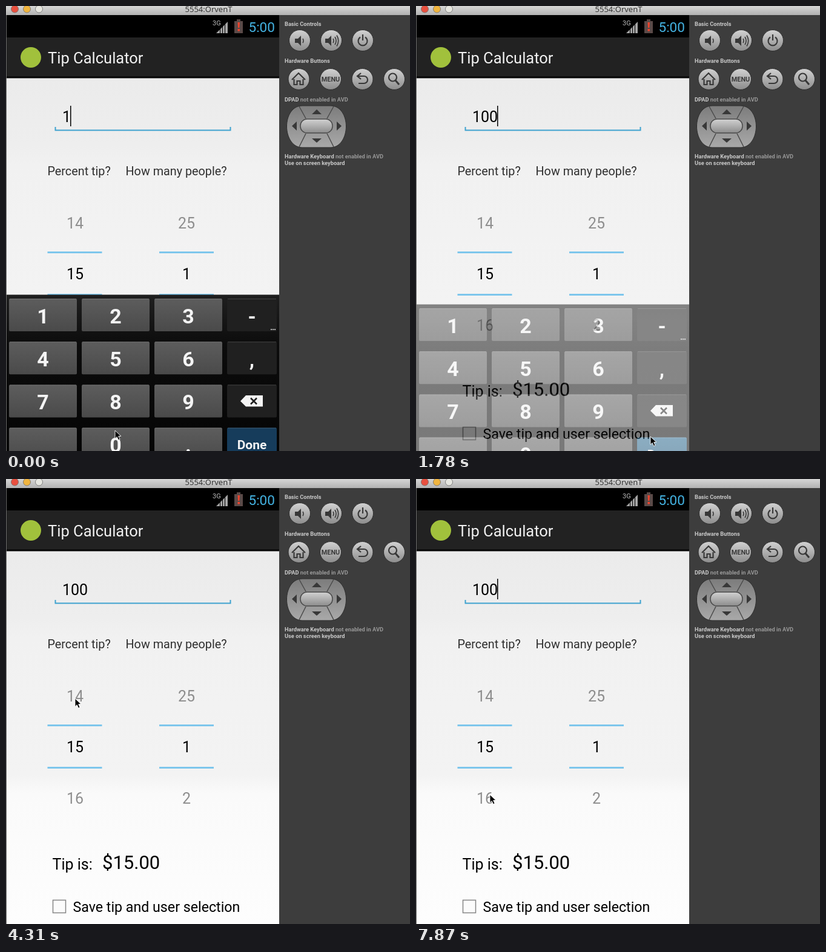
These frames come from a looping animation (667 by 736 pixels, 8 s). An HTML page:

```html
<!DOCTYPE html>
<html lang="en">
<head>
<meta charset="utf-8">
<title>Tip Calculator</title>
<style>
  html, body { margin: 0; width: 100%; height: 100%; overflow: hidden; background: #3d3d3d; }
  svg { display: block; width: 667px; height: 736px; }
  text { font-family: Roboto, sans-serif; }
  .mid { text-anchor: middle; }
  .wheel { font-size: 25px; text-anchor: middle; }
  .faint { fill: #8e8e8e; }
  .label { font-size: 19.8px; fill: #303030; }
  .note { font-size: 9.25px; font-weight: 700; fill: #c9c9c9; }
  .note .dim { fill: #979797; }
  .digit { font-size: 34px; font-weight: 700; fill: #f4f4f4; text-anchor: middle; }
  .key { fill: url(#key); }
  .dark { fill: #202020; }
  .done { fill: #163c5b; }
  .pressed { fill: url(#pressed); }
  .icon { fill: none; stroke: #383838; stroke-width: 2.2; }
  .solid { fill: #383838; stroke: none; }
</style>
</head>
<body>
<svg viewBox="0 0 667 736">
  <defs>
    <linearGradient id="bar" x2="0" y2="1"><stop stop-color="#d6d6d6"/><stop offset="1" stop-color="#b2b2b2"/></linearGradient>
    <linearGradient id="page" x2="0" y2="1">
      <stop stop-color="#ebebeb"/><stop offset=".18" stop-color="#eee"/>
      <stop offset=".23" stop-color="#f1f1f1"/><stop offset=".6" stop-color="#f3f3f3"/>
      <stop offset=".65" stop-color="#fafafa"/><stop offset="1" stop-color="#fdfdfd"/>
    </linearGradient>
    <linearGradient id="backing" x2="0" y2="1"><stop stop-color="#1f1f1f"/><stop offset=".3" stop-color="#0c0c0c"/><stop offset="1" stop-color="#040404"/></linearGradient>
    <linearGradient id="key" x2="0" y2="1"><stop stop-color="#5d5d5d"/><stop offset="1" stop-color="#4a4a4a"/></linearGradient>
    <linearGradient id="pressed" x2="0" y2="1"><stop stop-color="#28688f"/><stop offset="1" stop-color="#1a5075"/></linearGradient>
    <linearGradient id="metal" x2="0" y2="1"><stop stop-color="#d2d2d2"/><stop offset="1" stop-color="#8c8c8c"/></linearGradient>
    <linearGradient id="pad" x2="0" y2="1"><stop stop-color="#7c7c7c"/><stop offset="1" stop-color="#a9a9a9"/></linearGradient>
  </defs>

  <!-- Side panel -->
  <rect width="667" height="736" fill="#3d3d3d"/>
  <text class="note" x="460" y="32.5">Basic Controls</text>
  <text class="note" x="460" y="93.5">Hardware Buttons</text>
  <text class="note" x="460" y="157.5">DPAD <tspan class="dim">not enabled in AVD</tspan></text>
  <text class="note" x="460" y="252">Hardware Keyboard <tspan class="dim">not enabled in AVD</tspan></text>
  <text class="note" x="460" y="262.5">Use on screen keyboard</text>
  <g id="knobs"></g>
  <path class="solid" d="M477 54h5l5-5v17l-5-5h-5zM527 54h5l5-5v17l-5-5h-5z"/>
  <path class="icon" d="M490 54q2 3.500 0 7M540 54q2 3.500 0 7M543 51q4 6.500 0 13M546 48.500q5.500 9 0 18" style="stroke-width:1.6"/>
  <path class="icon" d="M585 51.500a7.500 7.500 0 1 0 8 0M589 47v10"/>
  <path class="icon" d="M472 122l11-11 11 11M475.500 121v9h5v-6h5v6h5v-9"/>
  <text class="mid" x="536" y="125" font-size="10.8" font-weight="700" fill="#383838">MENU</text>
  <path class="icon" d="M586 111l-6 5 6 5M581 116h10a5.500 5.500 0 0 1 0 12h-9"/>
  <circle class="icon" cx="638.500" cy="118" r="6.500"/><path class="icon" d="M643 123l6 7" style="stroke-width:3"/>
  <path d="M489 165h47c16 0 25.500 16 25.500 34s-9.500 35-25.500 35h-47c-16 0-25.500-17-25.500-35s9.500-34 25.500-34z" fill="url(#pad)" stroke="#2c2c2c"/>
  <path d="M484 166l11 20M541 166l-11 20M484 233l11-22M541 233l-11-22" stroke="#4a4a4a" stroke-width="1.500"/>
  <rect x="486" y="187" width="53" height="23" rx="11" fill="url(#metal)" stroke="#4a4a4a" stroke-width="1.500"/>
  <path class="solid" d="M505 179l8-8 8 8zM505 219l8 7 8-7zM480 191v15l-8-7.500zM546 191v15l8-7.500z"/>

  <!-- Window bar -->
  <rect width="667" height="15" fill="url(#bar)"/>
  <g stroke="#6b6b6b" stroke-width=".8">
    <circle cx="14.500" cy="5" r="6" fill="#e8503f"/><circle cx="34.500" cy="5" r="6" fill="#efb43f"/><circle cx="54.500" cy="5" r="6" fill="#e6e6e0"/>
  </g>
  <text class="mid" x="334.500" y="10" font-size="13" fill="#333" style="font-family:'Noto Sans',sans-serif">5554:OrvenT</text>

  <!-- Status and action bars -->
  <rect y="15" width="451" height="37" fill="#000"/>
  <text x="341" y="32" font-size="11" fill="#bbb">3G</text>
  <path d="M347 45l6-6v6zM354 45v-7l3-3v10zM358 45V34l3-3v14zM362 45V30l4-4v19z" fill="#a5a5a5"/>
  <path d="M377 25h4v-3h6v3h4v20h-14z" fill="#5a4a48"/>
  <path d="M382.500 27h3.500l-.6 9h-2.300zM382.500 38h3.500v3.500h-3.500z" fill="#f0452e"/>
  <text x="400.500" y="43" font-size="22.500" fill="#44b4e4">5:00</text>
  <rect y="52" width="451" height="65" fill="#222"/>
  <rect y="116.500" width="451" height="3" fill="#050505"/>
  <circle cx="41" cy="85" r="17" fill="#a1c13c"/>
  <text x="69" y="95" font-size="25.500" fill="#f1f1f1">Tip Calculator</text>

  <!-- Form -->
  <rect y="119.500" width="451" height="617" fill="url(#page)"/>
  <path d="M81.500 200v5.500h289V200" fill="none" stroke="#3ea2cf" stroke-width="2"/>
  <text id="amount" x="93" y="192" font-size="25"></text>
  <rect id="caret" y="165" width="1.500" height="34"/>
  <text class="label" x="68.500" y="279.500">Percent tip?</text>
  <text class="label" x="197.500" y="279.500">How many people?</text>
  <g id="wheels"></g>
  <path d="M68.500 407.500h90M253 407.500h90M68.500 477.500h90M253 477.500h90" stroke="#7dc6ec" stroke-width="3"/>
  <text x="76.500" y="646" font-size="25">Tip is:</text>
  <text x="159" y="645" font-size="31">$15.00</text>
  <rect x="77.500" y="696.500" width="21" height="21" fill="#fbfbfb" stroke="#858585" stroke-width="1.500"/>
  <text x="110.500" y="715.500" font-size="23.200">Save tip and user selection</text>

  <g id="keyboard">
    <rect y="477.500" width="451" height="280" fill="url(#backing)"/>
    <g id="keys"></g>
    <path d="M387 653.500l9-9.500h28v18.500h-28z" fill="#f4f4f4"/>
    <path d="M404 648.500l10 10M414 648.500l-10 10" stroke="#202020" stroke-width="2.500"/>
    <path d="M437 535h8" stroke="#bbb" stroke-width="2" stroke-dasharray="2 1"/>
  </g>
  <path d="M.5 15v721" stroke="#6a6a6a"/>
  <path id="mouse" d="M0 0v13.500l3.200-3 2.300 5.300 2.500-1.100-2.300-5.200H10z" stroke="#fff" stroke-width=".9"/>
</svg>
<script>
const $ = id => document.getElementById(id);

function add(parent, tag, attrs, text = "") {
  const el = document.createElementNS("http://www.w3.org/2000/svg", tag);
  for (const name in attrs) el.setAttribute(name, attrs[name]);
  el.textContent = text;
  return parent.appendChild(el);
}

for (const [cx, cy] of [[485, 57], [537, 57], [589, 57], [483.5, 121], [536, 121], [588.5, 121], [641, 121]])
  add($("knobs"), "circle", { cx, cy, r: 17.5, fill: "url(#metal)", stroke: "#2c2c2c" });

[[114, 14, 15, 16], [298, 25, 1, 2]].forEach(([x, ...values]) =>
  values.forEach((value, i) =>
    add($("wheels"), "text", { x, y: 368 + i * 84.3, class: i === 1 ? "wheel" : "wheel faint" }, value)));

const keys = {};
[["1", "2", "3", "-"], ["4", "5", "6", ","], ["7", "8", "9", ""], ["", "0", ".", "Done"]].forEach((row, r) =>
  row.forEach((label, c) => {
    const x = 5 + c * 120, y = 484 + r * 71.2, width = c === 3 ? 82 : 112;
    const kind = label === "Done" ? "done" : c === 3 ? "dark" : "key";
    const rect = add($("keys"), "rect", { x, y, width, height: 54, rx: 2, class: kind });
    add($("keys"), "path", { d: `M${x + 1} ${y + .5}h${width - 2}`, stroke: "#fff", opacity: .17 });
    const text = add($("keys"), "text", { x: x + width / 2, y: y + 40.5, class: "digit" }, label);
    if (kind === "done") { text.setAttribute("y", 733); text.style.fontSize = "21px"; }
    keys[label] = { rect, kind };
  }));

const LOOP = 8000, STEP = 148.4;

// Pointer stops: step, x, y
const stops = [
  [0, 180, 702], [5, 180, 702], [9, 387, 712], [16, 387, 712], [24, 117, 378], [26, 114, 363],
  [41, 114, 363], [45, 113, 389], [49, 113, 389], [51, 131, 465], [53, 122, 522], [54, 122, 522]
];

function pointer(n) {
  const i = Math.max(1, stops.findIndex(stop => stop[0] >= n));
  const [n0, x0, y0] = stops[i - 1], [n1, x1, y1] = stops[i];
  const k = (n - n0) / (n1 - n0), ease = k * k * (3 - 2 * k);
  return [x0 + (x1 - x0) * ease, y0 + (y1 - y0) * ease];
}

function press(label, on) {
  const { rect, kind } = keys[label];
  rect.setAttribute("class", on ? "pressed" : kind);
}

function draw(time) {
  const n = Math.floor((time % LOOP) / STEP + .03);
  const amount = n < 3 ? "1" : n < 5 ? "10" : "100";
  $("amount").textContent = amount;

  const blink = (n * 148.5 + 280) % 1000;
  $("caret").setAttribute("x", 92 + amount.length * 14);
  $("caret").style.visibility = n < 5 || blink < 470 ? "visible" : "hidden";

  press("0", n === 3 || n === 5);
  press("Done", n >= 10);
  const leaving = n >= 12, keyboard = $("keyboard");
  keyboard.setAttribute("transform", `translate(0 ${leaving ? 16 : 0})`);
  keyboard.setAttribute("opacity", leaving ? .53 : 1);
  keyboard.style.display = n >= 13 ? "none" : "";

  $("mouse").setAttribute("transform", `translate(${pointer(n)})`);
}

const start = performance.now();
function tick() {
  draw(performance.now() - start);
  requestAnimationFrame(tick);
}
tick();
</script>
</body>
</html>
```
